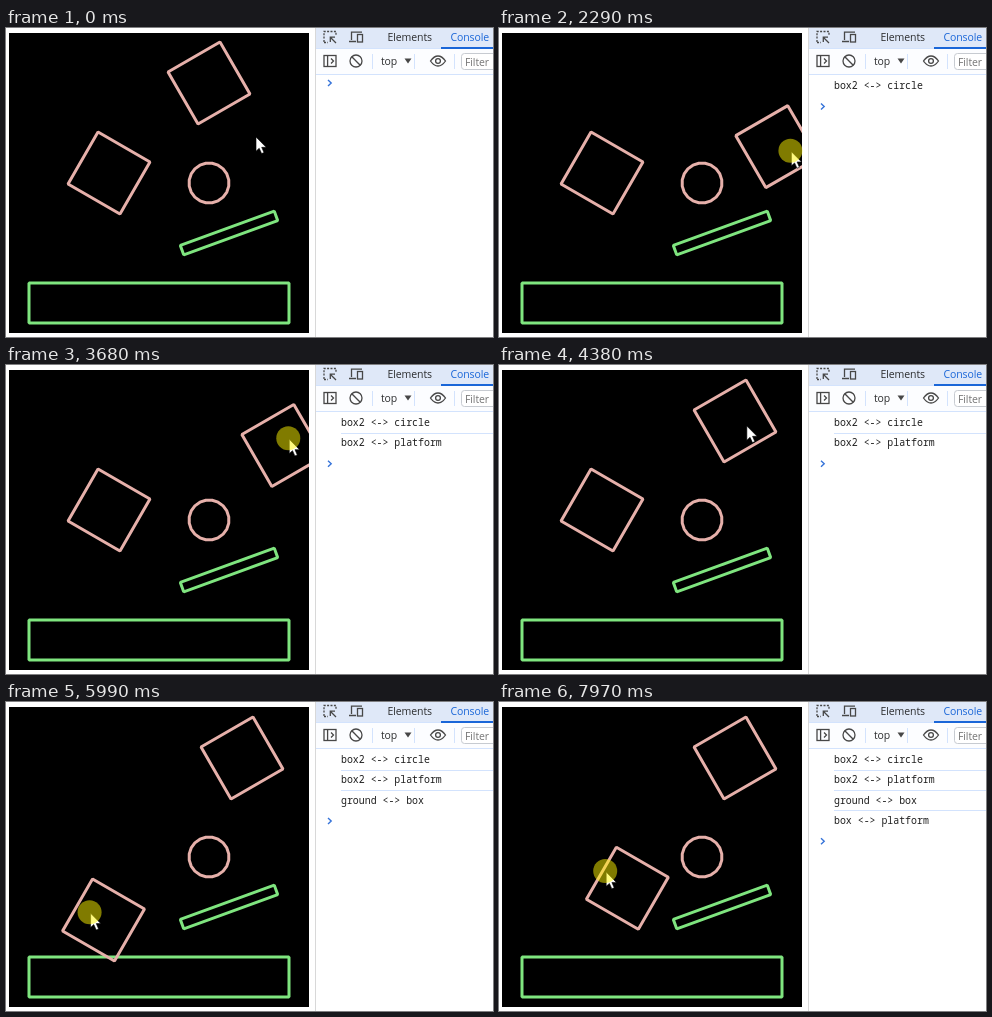
Write an HTML page that moves like this. It is 487x309 px and loops after 8 s.

```html
<!DOCTYPE html>
<html lang="en">
<head>
<meta charset="utf-8">
<title>Collision log</title>
<style>
html, body { margin: 0; width: 100%; height: 100%; overflow: hidden; background: #fff; }
svg { display: block; width: 100vw; height: 100vh; }
.ui { font: 10.5px "Open Sans", sans-serif; letter-spacing: -.1px; fill: #2b2c2e; }
.log { font: 9.9px "Noto Sans Mono", monospace; fill: #1f1f1f; white-space: pre; }
.icon { fill: none; stroke: #474747; stroke-width: 1.3; }
.shape { fill: none; stroke-width: 3; stroke-linejoin: bevel; }
.rule { stroke: #d3e3fd; }
</style>
</head>
<body>
<svg viewBox="0 0 487 309">
  <defs><clipPath id="stage"><rect x="3" y="5" width="300" height="300"/></clipPath></defs>
  <rect width="487" height="309" fill="#fff"/>

  <rect x="310" width="177" height="20" fill="#dfe8f8"/>
  <rect x="310" y="21" width="177" height="25" fill="#fcfdff"/>
  <path class="rule" d="M310 20.5H487M310 46.5H487M366.5 26V41M408.5 26V41M448.5 26V41"/>
  <path d="M309.5 0V309" stroke="#d8d8d8"/>
  <path d="M435 20H487" stroke="#1a66d8" stroke-width="2"/>
  <g class="icon">
    <path d="M318 14V3.5H330V8M318 14.5H322" stroke-dasharray="2 1.4"/>
    <path d="M330 15L324.5 9.5M324.3 14V9.2H329"/>
    <path d="M356 4.2H345.5V12M343 13.5H350"/>
    <rect x="351.5" y="6.5" width="5" height="7.5"/>
    <rect x="318" y="27.5" width="12" height="11"/>
    <path d="M321.6 27.5V38.5M325 30.5L327.5 33L325 35.5"/>
    <circle cx="350" cy="33" r="6"/>
    <path d="M345.8 28.8L354.2 37.2"/>
    <path d="M424.5 33Q428 28 432 28T439.5 33Q436 38 432 38T424.5 33Z"/>
    <circle cx="432" cy="33" r="2.4"/>
  </g>
  <path d="M398.5 30.5H405.5L402 35.5Z" fill="#474747"/>
  <g class="ui">
    <text x="381.5" y="13">Elements</text>
    <text x="444.5" y="13" fill="#1a66d8">Console</text>
    <text x="375" y="37">top</text>
    <rect x="455.5" y="25.5" width="50" height="16" rx="3" fill="#fff" stroke="#c7cbd1"/>
    <text x="459" y="38" fill="#757575">Filter</text>
  </g>

  <g id="logs"></g>
  <path id="prompt" d="M-2 -3L1.2 0L-2 3" fill="none" stroke="#3573d9" stroke-width="1.4"/>

  <rect x="3" y="5" width="300" height="300" fill="#000"/>
  <g class="shape" clip-path="url(#stage)">
    <g stroke="#7fe57f">
      <rect x="23" y="255" width="260" height="40"/>
      <rect x="-50" y="-5" width="100" height="10" transform="translate(223 205) rotate(-20)"/>
    </g>
    <g stroke="#e6b0aa">
      <polygon id="circle" transform="translate(203 155)"/>
      <g id="box"><rect x="-30" y="-30" width="60" height="60" transform="rotate(30)"/></g>
      <g id="box2"><rect x="-30" y="-30" width="60" height="60" transform="rotate(-30)"/></g>
    </g>
  </g>
  <g id="cursor">
    <path d="M0 0V14.2L3.2 11.3L5.6 16.6L8 15.6L5.7 10.3H10.2Z" fill="#fff" stroke="#000" stroke-width=".6"/>
    <circle id="press" cx="-1" cy="-1" r="12" fill="#fff500" fill-opacity=".5"/>
  </g>
</svg>
<script>
const LOOP = 8000;
const LAG = 60; // a held box trails the pointer
const $ = id => document.getElementById(id);

// Pointer strokes: points are evenly spaced in time, at rest on both ends
const home = [250, 109];
const strokes = [
  { from: 30, to: 270, via: [[217, 59]] },
  { from: 430, to: 1240, via: [[231, 96]] },
  { from: 1240, to: 2250, via: [[232, 113], [258, 84], [292, 123]] },
  { from: 2250, to: 2930, via: [[302, 145], [297, 161]] },
  { from: 3290, to: 4060, via: [[303, 121], [284, 75], [258, 61], [250, 60]] },
  { from: 4350, to: 4800, via: [[91, 134]] },
  { from: 4970, to: 6080, via: [[109, 151], [91, 186], [84, 214]] },
  { from: 6240, to: 6600, via: [[138, 188]] },
  { from: 7140, to: 7270, via: [[141, 189]] },
  { from: 7780, to: 7980, via: [[107, 170]] }
];
strokes.forEach((s, i) => {
  s.points = [i ? strokes[i - 1].via.at(-1) : home, ...s.via];
});

const boxes = [
  { id: "box2", x: 203, y: 55, grab: 430, drop: 4350 },
  { id: "box", x: 103, y: 145, grab: 4970, drop: LOOP }
];
const messages = [
  [1300, "box2 <-> circle"], [2900, "box2 <-> platform"],
  [5940, "ground <-> box"], [7200, "box <-> platform"]
];

const clamp = (v, lo, hi) => Math.min(hi, Math.max(lo, v));

// Harmonic mean of neighbouring steps: smooth, without overshoot
function tangent(p, i) {
  const a = p[i] - p[i - 1], b = p[i + 1] - p[i];
  return a * b > 0 ? 2 * a * b / (a + b) : 0;
}

function spline(p, progress) {
  const pos = progress * (p.length - 1);
  const i = Math.min(Math.floor(pos), p.length - 2);
  const u = pos - i, v = 1 - u;
  return v * v * (1 + 2 * u) * p[i] + u * u * (3 - 2 * u) * p[i + 1]
    + u * v * (v * tangent(p, i) - u * tangent(p, i + 1));
}

function pointer(t) {
  const s = strokes.findLast(s => t >= s.from) || strokes[0];
  const progress = clamp((t - s.from) / (s.to - s.from), 0, 1);
  return [0, 1].map(axis => spline(s.points.map(p => p[axis]), progress));
}

function place(id, x, y) {
  $(id).setAttribute("transform", `translate(${x.toFixed(2)} ${y.toFixed(2)})`);
}

const show = (el, on) => el.setAttribute("visibility", on ? "visible" : "hidden");

const SIDES = 20;
$("circle").setAttribute("points", Array.from({ length: SIDES }, (_, i) => {
  const a = (i + .5) * 2 * Math.PI / SIDES;
  return [20 * Math.cos(a), 20 * Math.sin(a)];
}).join(" "));

$("logs").innerHTML = messages.map(([, text], i) => {
  const y = 61 + i * 20.3;
  const rule = i ? `<path class="rule" d="M335 ${Math.floor(y - 13) + .5}H487"/>` : "";
  return `<g>${rule}<text class="log" x="335" y="${y}">${text.replace(/</g, "&lt;").replace(/>/g, "&gt;")}</text></g>`;
}).join("");
const rows = [...$("logs").children];

function draw(t) {
  place("cursor", ...pointer(t));
  for (const { id, x, y, grab, drop } of boxes) {
    const [x0, y0] = pointer(grab);
    const [x1, y1] = pointer(clamp(t - LAG, grab, drop - 1));
    place(id, x + x1 - x0, y + y1 - y0);
  }
  show($("press"), boxes.some(b => t >= b.grab && t < b.drop));
  rows.forEach((row, i) => show(row, t >= messages[i][0]));
  const count = messages.filter(m => t >= m[0]).length;
  place("prompt", 324, count ? 58.4 + count * 20.2 : 55);
}

const start = performance.now();
function tick() {
  draw((performance.now() - start) % LOOP);
  requestAnimationFrame(tick);
}
draw(0);
requestAnimationFrame(tick);
</script>
</body>
</html>
```
